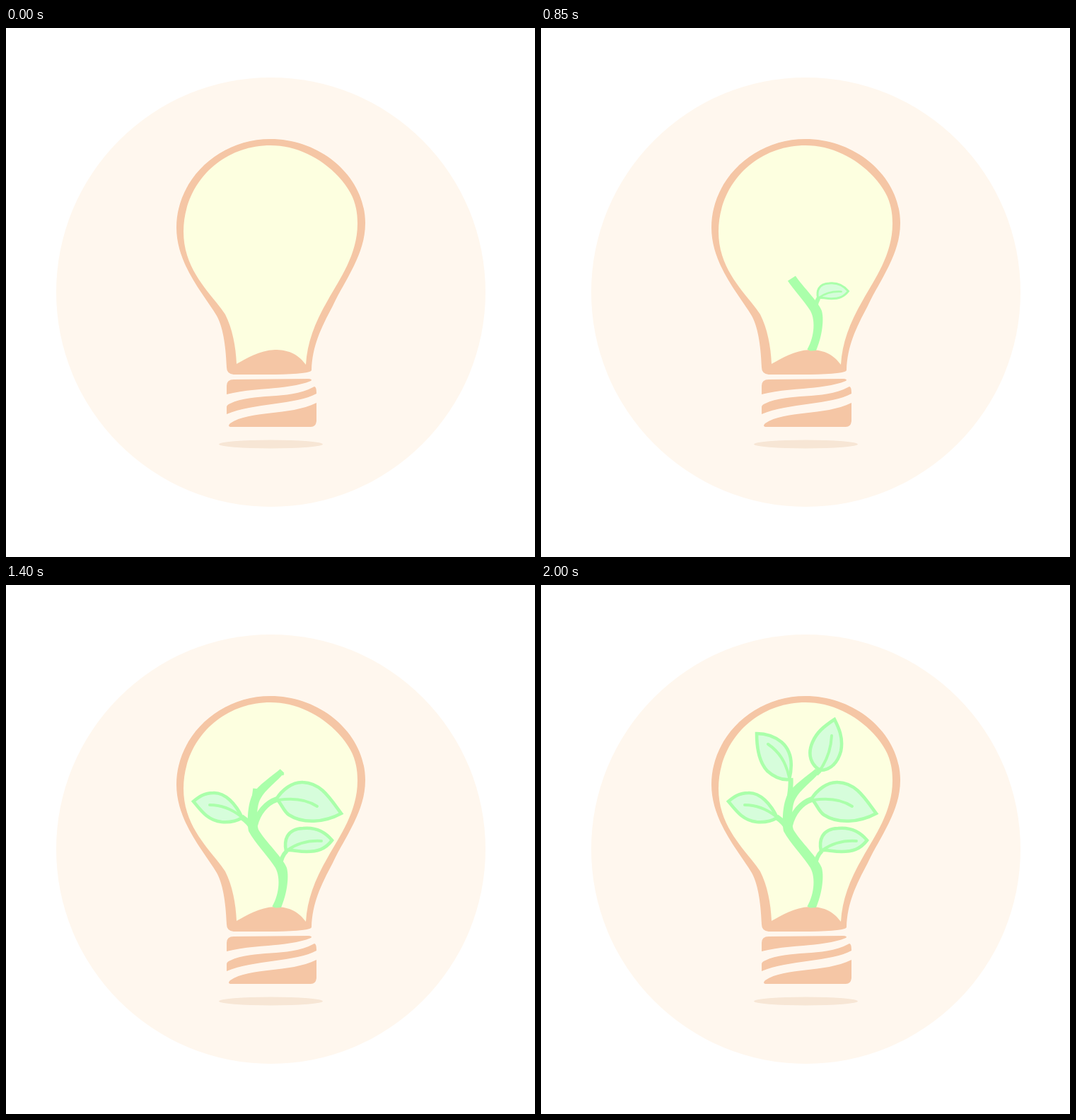
Write an HTML page that moves like this. It is 748 px wide and 748 px high and loops after 2.5 s.

```html
<!DOCTYPE html>
<html lang="en">
<head>
<meta charset="utf-8">
<title>Growing idea</title>
<style>
  html, body { margin: 0; width: 100%; height: 100%; overflow: hidden; background: #fff; }
  svg { display: block; width: 100vw; height: 100vh; }
  .clay { fill: #f5c6a5; }
  .branch, .vein { fill: none; stroke: #aaffaa; }
  .vein { stroke-width: 4; stroke-linecap: round; }
  .blade { fill: #d6fddb; stroke: #aaffaa; stroke-width: 4.6; stroke-miterlimit: 8; }
</style>
</head>
<body>
<svg viewBox="0 0 748 748">
  <defs>
    <mask id="reveal" maskUnits="userSpaceOnUse" x="0" y="0" width="748" height="748">
      <path id="spine" fill="none" stroke="#fff" stroke-width="24"
        d="M383 458C393 440 396 415 388 400C380 385 358 363 350 346C346 330 349 305 357 295C365 284 380 275 392 262"/>
    </mask>
  </defs>
  <circle cx="374.5" cy="373.5" r="303.5" fill="#fff7ee"/>
  <ellipse cx="374.5" cy="588.5" rx="73.5" ry="6" fill="#f7e6d5"/>

  <!-- bulb: rim, glass, screw threads -->
  <path class="clay" d="M374 157C445 157 508 210 508 276C508 320 480 355 462 393C445 425 433 450 432 484Q431 489 380 490L322 490Q312 489 312 480C311 455 308 425 298 407C281 378 241 335 241 282C241 215 300 157 374 157Z"/>
  <path fill="#fdffe0" d="M374 166C410 166 445 183 470 210C490 232 497 250 497 277C497 320 472 355 455 385C436 418 426 445 424 476C412 460 398 455 380 455C358 456 340 467 326 475C325 450 320 425 310 405C293 378 251 345 251 288C251 220 305 166 374 166Z"/>
  <path class="clay" d="M322 497L428 496Q434 497 431 499C400 512 350 508 312 518L312 506Q312 497 322 497Z"/>
  <path class="clay" d="M436 507Q439 507 439 517C410 533 350 530 312 546L312 536Q312 533 317 531C350 515 400 527 436 507Z"/>
  <path class="clay" d="M439 530L439 556Q438 564 431 564L317 564Q313 563 317 559C345 540 400 549 439 530Z"/>

  <g id="plant">
    <path mask="url(#reveal)" fill="#aaffaa"
      d="M375 457C386 440 389 415 381 400C372 385 352 365 343 348C340 330 343 304 350 294C357 283 376 270 388 260L394 265C384 277 366 290 360 302C354 312 354 335 357 346C366 362 392 386 397 400C401 415 396 440 389 456Z"/>
  </g>
</svg>
<script>
const LOOP = 2500, STEP = 50, LEAF_TIME = 510;

// Each leaf sits at the end of its branch; turn is the angle it still has to unfold.
const leaves = [
  { start: 540, turn: 0, width: 6,
    branch: 'M388 396C389 386 393 380 397 376',
    blade: 'M396 376C393 362 396 345 420 344C440 342 452 350 461 361C451 374 440 377 425 377C410 377 402 373 396 376Z',
    vein: 'M398 375C412 365 430 361 446 362' },
  { start: 835, turn: 0, width: 8,
    branch: 'M349 346Q345 336 333 328',
    blade: 'M334 329C325 310 310 293 293 294C280 294 272 300 265 306C275 318 285 333 305 335C318 336 326 334 334 329Z',
    vein: 'M332 327C318 316 305 311 288 311' },
  { start: 850, turn: -48, width: 8,
    branch: 'M352 340C356 322 368 308 383 303',
    blade: 'M382 303C390 290 405 278 420 279C445 280 457 300 474 323C450 336 420 338 400 325C392 320 388 305 382 303Z',
    vein: 'M385 304C405 301 425 303 440 313' },
  { start: 1420, turn: 40, width: 7, sprout: [1300, 1460],
    branch: 'M350 312C350 300 354 292 353 273',
    blade: 'M351 275C356 255 355 235 340 222C330 214 318 210 305 210C305 230 308 250 320 263C330 272 340 276 351 275Z',
    vein: 'M351 272C346 250 337 236 321 225' },
  { start: 1420, turn: 25, width: 7, sprout: [1380, 1430],
    branch: 'M389 267L394 262',
    blade: 'M395 262C382 255 376 240 384 222C390 208 400 200 415 190C420 200 428 215 424 235C420 250 410 262 395 262Z',
    vein: 'M395 261C404 248 410 232 411 213' }
];

const plant = document.getElementById('plant');
const spine = document.getElementById('spine');
const clamp = x => Math.min(1, Math.max(0, x));
const ease = x => x * x * (3 - 2 * x);

function add(parent, tag, attrs) {
  const el = document.createElementNS('http://www.w3.org/2000/svg', tag);
  for (const key in attrs) el.setAttribute(key, attrs[key]);
  return parent.appendChild(el);
}

function reveal(path, length) {
  path.setAttribute('stroke-dasharray', length + ' 999');
}

for (const leaf of leaves) {
  leaf.stalk = add(plant, 'path', { class: 'branch', d: leaf.branch, 'stroke-width': leaf.width });
  leaf.group = add(plant, 'g', {});
  add(leaf.group, 'path', { class: 'blade', d: leaf.blade });
  add(leaf.group, 'path', { class: 'vein', d: leaf.vein });
  leaf.length = leaf.stalk.getTotalLength();
  leaf.end = leaf.stalk.getPointAtLength(leaf.length);
}

function draw(t) {
  reveal(spine, Math.max(0, (t - 255) * 0.197));
  for (const leaf of leaves) {
    const size = ease(clamp((t - leaf.start) / LEAF_TIME));
    const [from, to] = leaf.sprout || [];
    const grown = leaf.length * (leaf.sprout ? clamp((t - from) / (to - from)) : size);
    const tip = leaf.stalk.getPointAtLength(grown);
    reveal(leaf.stalk, grown);
    leaf.stalk.style.display = grown ? '' : 'none';
    leaf.group.style.display = size ? '' : 'none';
    leaf.group.setAttribute('transform',
      `translate(${tip.x} ${tip.y}) rotate(${(1 - size) * leaf.turn}) scale(${size}) translate(${-leaf.end.x} ${-leaf.end.y})`);
  }
}

const begin = performance.now();
function frame() {
  const t = (performance.now() - begin) % LOOP;
  draw(Math.floor(t / STEP) * STEP);
  requestAnimationFrame(frame);
}
frame();
</script>
</body>
</html>
```
